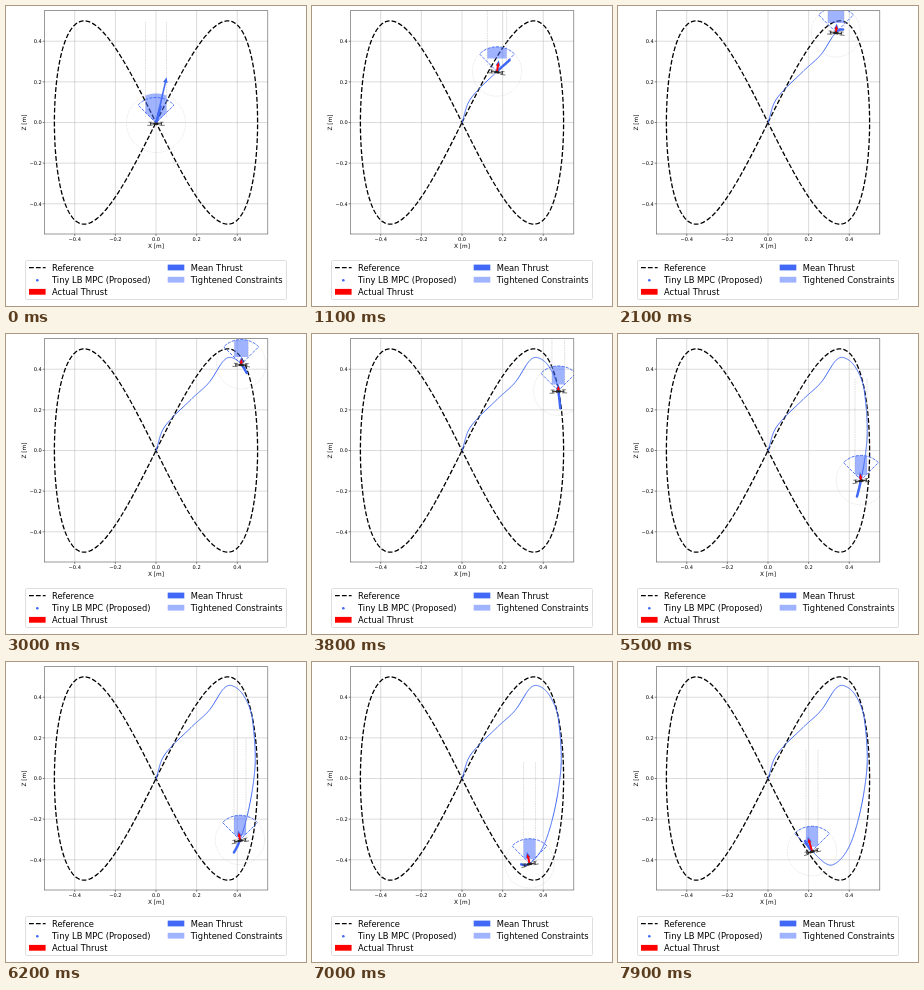
An HTML page with a canvas for the animation above (8 s loop, 300 by 300 pixels).

```html
<!DOCTYPE html>
<html>
<head>
<meta charset="utf-8">
<style>
html, body { margin: 0; width: 100%; height: 100%; overflow: hidden; background: #fff; }
canvas { display: block; width: 300px; height: 300px; }
</style>
</head>
<body>
<canvas id="stage"></canvas>
<script>
const LOOP = 8000, STEP = 100, AHEAD = 340;
const CX = 150, CY = 116.5, UNIT = 203.2;
const BOX = { x: 38.5, y: 4.7, w: 223.3, h: 223.3 };
const BLUE = '#4169f5', TIGHT = 'rgba(65,105,255,0.5)';
const FONT = '"DejaVu Sans", Verdana, sans-serif';
const DASH = [4.8, 2.1];

// key points of the flight: time, x, y
const PATH = [
  [0, 150, 117], [500, 158.5, 93], [1100, 185, 65.5], [1600, 203, 48.5],
  [2100, 218, 26.3], [2600, 228, 24.5], [3200, 238.5, 35], [3800, 246.3, 56.7],
  [4800, 248.6, 110.3], [6200, 234, 178], [7150, 214, 203], [7900, 194, 189],
  [8400, 184, 174]
];

const canvas = document.getElementById('stage');
const g = canvas.getContext('2d');
const ratio = window.devicePixelRatio || 1;
canvas.width = canvas.height = 300 * ratio;

const px = x => CX + x * UNIT;
const py = z => CY - z * UNIT;
const rad = deg => deg * Math.PI / 180;

// Hermite curve through the key points
function position(t) {
  const last = PATH.length - 1;
  let i = 0;
  while (i < last - 1 && t >= PATH[i + 1][0]) i++;
  const a = PATH[i], b = PATH[i + 1], d = b[0] - a[0];
  const u = (t - a[0]) / d, u2 = u * u, u3 = u2 * u;
  const slope = (j, k) => {
    const p = PATH[Math.max(0, j - 1)], q = PATH[Math.min(last, j + 1)];
    return (q[k] - p[k]) / (q[0] - p[0]);
  };
  return [1, 2].map(k =>
    (2 * u3 - 3 * u2 + 1) * a[k] + (u3 - 2 * u2 + u) * d * slope(i, k) +
    (3 * u2 - 2 * u3) * b[k] + (u3 - u2) * d * slope(i + 1, k));
}

// thrust and constraint sizes; they settle after a short take-off
function stateAt(t) {
  const s = t / 1000, ramp = Math.min(1, s / 0.3);
  const actual = ramp * (5 + 8 * ((s - 4) / 3.9) ** 2);
  return {
    half: 6 + 4.5 * Math.exp(-((s / 2.4) ** 2)),
    floor: ramp * (4 + 16 * Math.exp(-s / 1.9)),
    radius: 24.7 + 4.8 * Math.exp(-s / 0.15),
    angle: 13 - 3.7 * s,
    pitch: ramp * (12 - 3.5 * s),
    actual,
    mean: actual + 2 * ramp + 47 * (1 - ramp)
  };
}

function line(points, color, width, dash = []) {
  g.beginPath();
  points.forEach(p => g.lineTo(p[0], p[1]));
  g.strokeStyle = color;
  g.lineWidth = width;
  g.setLineDash(dash);
  g.stroke();
  g.setLineDash([]);
}

function text(s, x, y, size, align = 'left') {
  g.font = size + 'px ' + FONT;
  g.textAlign = align;
  g.textBaseline = 'alphabetic';
  g.fillStyle = '#000';
  g.fillText(s, x, y);
}

function flight(from, to) {
  const pts = [];
  for (let t = from; t <= to; t += 20) pts.push(position(t));
  return pts;
}

function drawGrid() {
  const right = BOX.x + BOX.w, bottom = BOX.y + BOX.h;
  for (let i = -2; i <= 2; i++) {
    const v = i * 0.2, x = px(v), y = py(v);
    const label = v.toFixed(1).replace('-', '\u2212');
    line([[x, BOX.y], [x, bottom]], '#b8b8b8', 0.5);
    line([[BOX.x, y], [right, y]], '#b8b8b8', 0.5);
    line([[x, bottom], [x, bottom + 1.8]], '#000', 0.5);
    line([[BOX.x - 1.8, y], [BOX.x, y]], '#000', 0.5);
    text(label, x, 235.2, 5.1, 'center');
    text(label, 35.8, y + 1.9, 5.1, 'right');
  }
  text('X [m]', CX, 242, 5.8, 'center');
  g.save();
  g.translate(20, CY);
  g.rotate(-Math.PI / 2);
  text('Z [m]', 0, 0, 5.8, 'center');
  g.restore();
}

function drawReference() {
  const pts = [];
  for (let i = 0; i <= 400; i++) {
    const a = i / 400 * 2 * Math.PI;
    pts.push([px(0.5 * Math.sin(a)), py(0.5 * Math.sin(2 * a))]);
  }
  line(pts, '#000', 1.3, DASH);
}

function drawConstraints({ half, floor, radius }) {
  const up = -Math.PI / 2, cone = Math.PI / 4;
  g.beginPath();
  g.arc(0, 0, radius, 0, 2 * Math.PI);
  g.strokeStyle = '#c8c8c8';
  g.lineWidth = 0.5;
  g.setLineDash([0.8, 0.8]);
  g.stroke();
  for (const x of [-half, half])
    line([[x, -6], [x, -101]], '#bbb', 0.5, [1.6, 0.8]);

  // strip cut by the thrust cone and the disk
  const side = Math.asin(half / radius);
  const foot = Math.min(half, floor), hip = Math.max(half, floor);
  g.beginPath();
  g.moveTo(-foot, -floor);
  g.lineTo(-half, -hip);
  g.arc(0, 0, radius, up - side, up + side);
  g.lineTo(half, -hip);
  g.lineTo(foot, -floor);
  g.closePath();
  g.fillStyle = TIGHT;
  g.fill();

  g.beginPath();
  g.moveTo(0, 0);
  g.arc(0, 0, Math.min(radius, 25.5), up - cone, up + cone);
  g.closePath();
  g.strokeStyle = BLUE;
  g.lineWidth = 0.9;
  g.setLineDash([3, 1.3]);
  g.stroke();
  g.setLineDash([]);
}

function arrow(angle, length, color, width, head) {
  if (length < 1) return;
  const h = Math.min(head, length);
  g.save();
  g.rotate(rad(angle));
  line([[0, 0], [0, -length + h * 0.8]], color, width);
  g.beginPath();
  g.moveTo(0, -length);
  g.lineTo(h * 0.42, -length + h);
  g.lineTo(-h * 0.42, -length + h);
  g.fillStyle = color;
  g.fill();
  g.restore();
}

function drawVehicle(pitch) {
  g.save();
  g.rotate(rad(pitch));
  line([[-6, 0.8], [6, 0.8]], '#222', 0.9);
  for (const side of [-1, 1]) {
    line([[side * 3.5, 2.2], [side * 8.8, 2.4]], '#444', 0.7);
    line([[side * 3.5, -0.6], [side * 7.5, -0.8]], '#444', 0.7);
    line([[side * 5.5, -1], [side * 5.5, 2.4]], '#222', 0.7);
  }
  g.fillStyle = '#222';
  g.fillRect(-2.5, -0.5, 5, 2.4);
  g.restore();
}

function drawLegend() {
  const rows = [264.6, 276.8, 288.9], size = 8.34;
  g.beginPath();
  g.roundRect(19.5, 254.5, 261, 39, 1.6);
  g.fillStyle = '#fff';
  g.fill();
  g.strokeStyle = '#d0d0d0';
  g.lineWidth = 0.7;
  g.stroke();
  const patch = (x, row, color) => {
    g.fillStyle = color;
    g.fillRect(x, rows[row] - 6, 16.6, 5.8);
  };
  line([[23, 261.7], [39.6, 261.7]], '#000', 1.3, DASH);
  g.beginPath();
  g.arc(31.3, 274.3, 1.3, 0, 2 * Math.PI);
  g.fillStyle = BLUE;
  g.fill();
  patch(23, 2, '#f00');
  patch(161.7, 0, BLUE);
  patch(161.7, 1, TIGHT);
  ['Reference', 'Tiny LB MPC (Proposed)', 'Actual Thrust']
    .forEach((s, i) => text(s, 46, rows[i], size));
  ['Mean Thrust', 'Tightened Constraints']
    .forEach((s, i) => text(s, 184.7, rows[i], size));
}

function draw(t) {
  const s = stateAt(t), [x, y] = position(t);
  g.setTransform(ratio, 0, 0, ratio, 0, 0);
  g.fillStyle = '#fff';
  g.fillRect(0, 0, 300, 300);
  drawGrid();

  g.save();
  g.beginPath();
  g.rect(BOX.x, BOX.y, BOX.w, BOX.h);
  g.clip();
  drawReference();
  line(flight(0, t), BLUE, 1);
  g.save();
  g.translate(x, y);
  drawConstraints(s);
  g.restore();
  g.lineCap = 'round';
  line(flight(t, t + AHEAD), BLUE, 2.5);
  g.lineCap = 'butt';
  g.translate(x, y);
  arrow(s.angle, s.mean, BLUE, 1.5, 5.5);
  arrow(s.angle, s.actual, '#f00', 1.9, 4);
  drawVehicle(s.pitch);
  g.restore();

  g.strokeStyle = '#555';
  g.lineWidth = 0.6;
  g.strokeRect(BOX.x, BOX.y, BOX.w, BOX.h);
  drawLegend();
}

const start = performance.now();
function tick(now) {
  const t = Math.max(0, now - start) % LOOP;
  draw(Math.floor(t / STEP) * STEP);
  requestAnimationFrame(tick);
}
draw(0);
requestAnimationFrame(tick);
</script>
</body>
</html>
```
